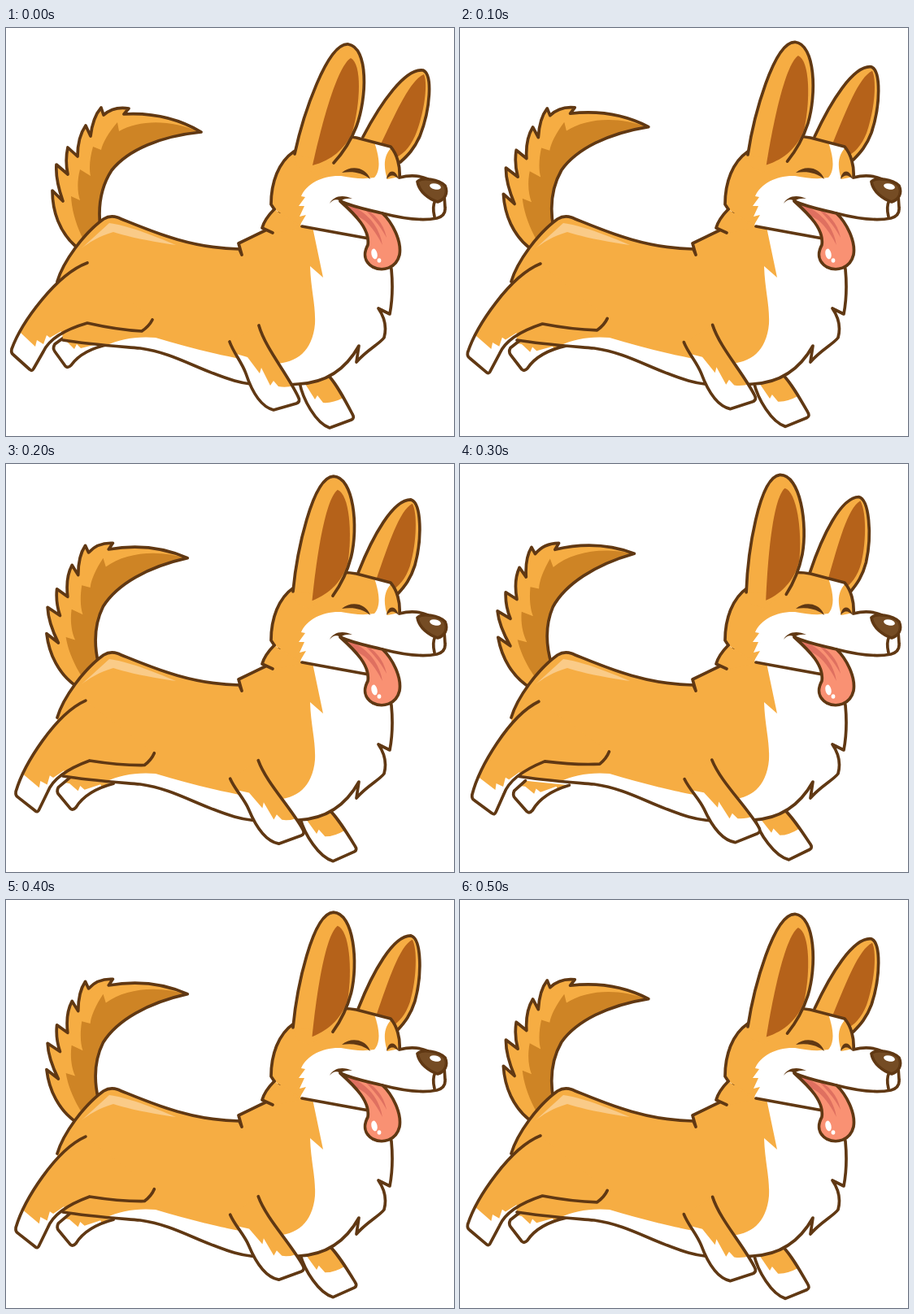
Write an HTML page that moves like this. It is 551x502 px and loops after 600 ms.

```html
<!DOCTYPE html>
<html lang="en">
<head>
<meta charset="utf-8">
<title>Running corgi</title>
<style>
  html, body { margin: 0; width: 100%; height: 100%; overflow: hidden; background: #fff; }
  svg { display: block; width: 551px; height: 502px; }
  .line { fill: none; stroke: #603813; stroke-width: 3.7; stroke-linecap: round; stroke-linejoin: round; }
  .coat { fill: #f6ad43; }
  .shade { fill: #ce8425; }
  .inner { fill: #b5621a; }
  .light { fill: #facb88; }
  .white { fill: #fff; }
  .brown { fill: #603813; }
  .nose { fill: #754c24; }
  .tongue { fill: #f99173; }
  .groove { fill: #df7060; }
</style>
</head>
<body>
<svg viewBox="0 0 551 502">
  <defs>
    <path id="body" d="M63 312C70 288 95 253 120 235Q128 230 137 233C177 249 225 271 287 272L290 279L286 265L319 249L345 215L450 235L470 280L474 297C476 318 475 336 472 352L458 345C467 358 468 370 465 381C459 389 444 396 431 411L434 391C424 409 404 436 360 438C330 441 305 441 281 434C236 421 208 400 165 394C130 391 100 389 70 384"/>
    <path id="head" d="M364 244L446 259L463 228C490 235 515 237 530 234Q541 231 540 221L539 206L519 186C508 181 495 181 484 184C485 170 481 155 473 146L431 135Q415 132 400 135L354 152C335 165 326 190 326 217L330 223"/>
    <path id="tongue" d="M411 213C429 221 447 224 463 228C475 239 487 262 484 279C480 296 463 300 451 294C441 288 439 278 445 267C448 248 430 230 411 213Z"/>
    <path id="tail" d="M98 278L85 268C66 251 57 226 57 200L70 213C64 196 61 181 62 168L76 180C73 166 74 156 76 147L88 158C88 141 91 130 98 120L104 133C106 116 110 106 117 98L120 107C128 100 139 97 151 99L145 106C180 104 213 112 240 128C190 133 150 150 130 175C117 195 113 220 116 245V262"/>
    <path id="ear" d="M355 155C365 108 395 18 421 20C446 24 444 86 431 121C424 139 414 154 403 166"/>
    <path id="hind" d="M100 289C62 303 19 362 7 395Q6 400 9 402L29 420Q32 423 34 419L46 398C54 381 76 370 100 363C122 368 148 372 167 373C173 369 177 365 180 359"/>
    <path id="farHind" d="M75 378L60 389Q57 394 60 398L73 416Q76 419 80 415C90 401 107 393 128 389"/>
    <path id="fore" d="M275 386C280 400 290 411 295 425C303 449 314 466 329 470L357 462Q363 460 359 453C345 424 319 394 311 366"/>
    <path id="farFore" d="M361 436C365 457 381 486 398 492L425 482Q429 480 426 475C416 456 407 439 397 428"/>
    <clipPath id="inBody"><use href="#body"/></clipPath>
    <clipPath id="inHead"><use href="#head"/></clipPath>
    <clipPath id="inHind"><use href="#hind"/></clipPath>
    <clipPath id="inFarHind"><use href="#farHind"/></clipPath>
    <clipPath id="inFore"><use href="#fore"/></clipPath>
    <clipPath id="inFarFore"><use href="#farFore"/></clipPath>
  </defs>

  <!-- data-turn: degrees per step, pivot x, pivot y -->
  <g data-turn="-3.38 127 264">
    <use href="#tail" class="coat"/>
    <path class="shade" d="M238 128C205 113 165 112 139 127L137 116C126 129 119 141 117 150L107 146C103 160 102 173 104 182L91 174C87 189 88 203 91 212L80 207C81 226 87 246 100 270L116 262V245C113 220 117 195 130 175C150 150 190 133 238 128Z"/>
    <use href="#tail" class="line"/>
  </g>

  <g data-turn="-1.95 192 330">
    <use href="#farHind" class="coat"/>
    <g clip-path="url(#inFarHind)">
      <path class="white" d="M50 380L74 385L84 395L87 389L92 394L112 389L130 430H50Z"/>
    </g>
    <use href="#farHind" class="line"/>
  </g>

  <g data-turn="-1.9 350 425">
    <use href="#farFore" class="coat"/>
    <g clip-path="url(#inFarFore)">
      <path class="white" d="M350 436L368 438L380 457L383 452L390 461Q401 462 415 455L440 500H350Z"/>
    </g>
    <use href="#farFore" class="line"/>
  </g>

  <g data-turn="-3.05 430 187">
    <path class="coat line" d="M439 134C461 92 491 49 513 52C525 57 522 100 509 133C502 149 494 157 485 165L465 172"/>
    <path class="inner" d="M460 145C480 103 497 64 514 57C519 68 515 104 503 133C496 148 487 157 476 161Z"/>
  </g>

  <use href="#body" class="coat"/>
  <g clip-path="url(#inBody)">
    <path class="white" d="M376 240L390 307L374 293C375 323 381 340 380 364C377 398 357 412 331 413C290 410 235 396 184 381C160 379 140 383 122 391L150 450H490V240Z"/>
  </g>
  <path class="light" d="M93 271L127 240C150 243 180 255 209 267C180 263 150 257 132 251C115 256 105 262 93 271Z"/>
  <use href="#body" class="line"/>

  <g data-turn="-1.9 131 322">
    <use href="#hind" class="coat"/>
    <g clip-path="url(#inHind)">
      <path class="white" d="M0 365L18 375L36 392L38 384L46 389L50 378L54 381L68 373L60 430H0Z"/>
    </g>
    <use href="#hind" class="line"/>
  </g>

  <g data-turn="-2 292 376">
    <use href="#fore" class="coat"/>
    <g clip-path="url(#inFore)">
      <path class="white" d="M280 400L297 405L312 425L314 418L325 440L329 434L335 441Q344 443 355 440L375 480H280Z"/>
    </g>
    <use href="#fore" class="line"/>
  </g>

  <use href="#head" class="coat"/>
  <path class="coat" d="M330 223C322 232 317 239 315 246L329 253L362 246Z"/>
  <path class="line" d="M330 223C322 231 317 239 315 246L328 252"/>
  <g clip-path="url(#inHead)">
    <path class="white" d="M360 250L363 240L369 230L361 232L367 219L360 219L368 208L363 207C370 191 390 181 412 182Q436 187 453 184C462 174 459 156 451 135L476 145C464 156 464 170 469 186L484 183L550 175V265Z"/>
  </g>
  <use href="#head" class="line"/>

  <path class="line" d="M528 212Q524 220 527 232"/>
  <path class="nose line" d="M506 189C512 183 532 186 540 194C544 203 540 211 531 214C519 210 508 201 506 189Z"/>
  <ellipse class="white" cx="528" cy="195" rx="7" ry="3.5" transform="rotate(12 528 195)"/>

  <use href="#tongue" class="tongue"/>
  <path class="groove" d="M413 214C438 222 458 238 463 267C452 246 443 236 431 231C442 242 447 255 445 267C449 248 429 229 413 214Z"/>
  <path class="groove" d="M440 222C454 228 465 242 468 258C461 244 450 232 440 222Z"/>
  <use href="#tongue" class="line"/>
  <ellipse class="white" cx="453" cy="278" rx="3.6" ry="6.5" transform="rotate(-12 453 278)"/>
  <ellipse class="white" cx="459" cy="286" rx="2.4" ry="2.8"/>
  <path class="brown" d="M398 216C402 207 414 204 426 210Q416 209 412 213C406 210 402 211 398 216Z"/>

  <path class="brown" d="M413 178C424 168 443 171 448 186C438 178 427 176 413 178Z"/>
  <path class="brown" d="M468 186C470 174 479 173 483 186C477 180 473 180 468 186Z"/>

  <g data-turn="-3.35 370 173">
    <use href="#ear" class="coat"/>
    <path class="coat" d="M355 155L403 166L372 178L358 170Z"/>
    <path class="inner" d="M377 169C386 128 406 48 424 37C438 44 436 92 426 128C417 149 400 163 377 169Z"/>
    <use href="#ear" class="line"/>
  </g>
</svg>
<script>
  const parts = [...document.querySelectorAll('[data-turn]')].map(el => {
    const [angle, x, y] = el.dataset.turn.split(' ').map(Number);
    return { el, angle, x, y };
  });

  // Each pose holds for 100 ms: three steps forward, three back.
  function draw(now) {
    const step = Math.floor(now / 100) % 6;
    const swing = 3 - Math.abs(3 - step);
    for (const { el, angle, x, y } of parts)
      el.setAttribute('transform', `rotate(${angle * swing} ${x} ${y})`);
  }

  const start = performance.now();
  function tick() {
    draw(performance.now() - start);
    requestAnimationFrame(tick);
  }
  tick();
</script>
</body>
</html>
```
